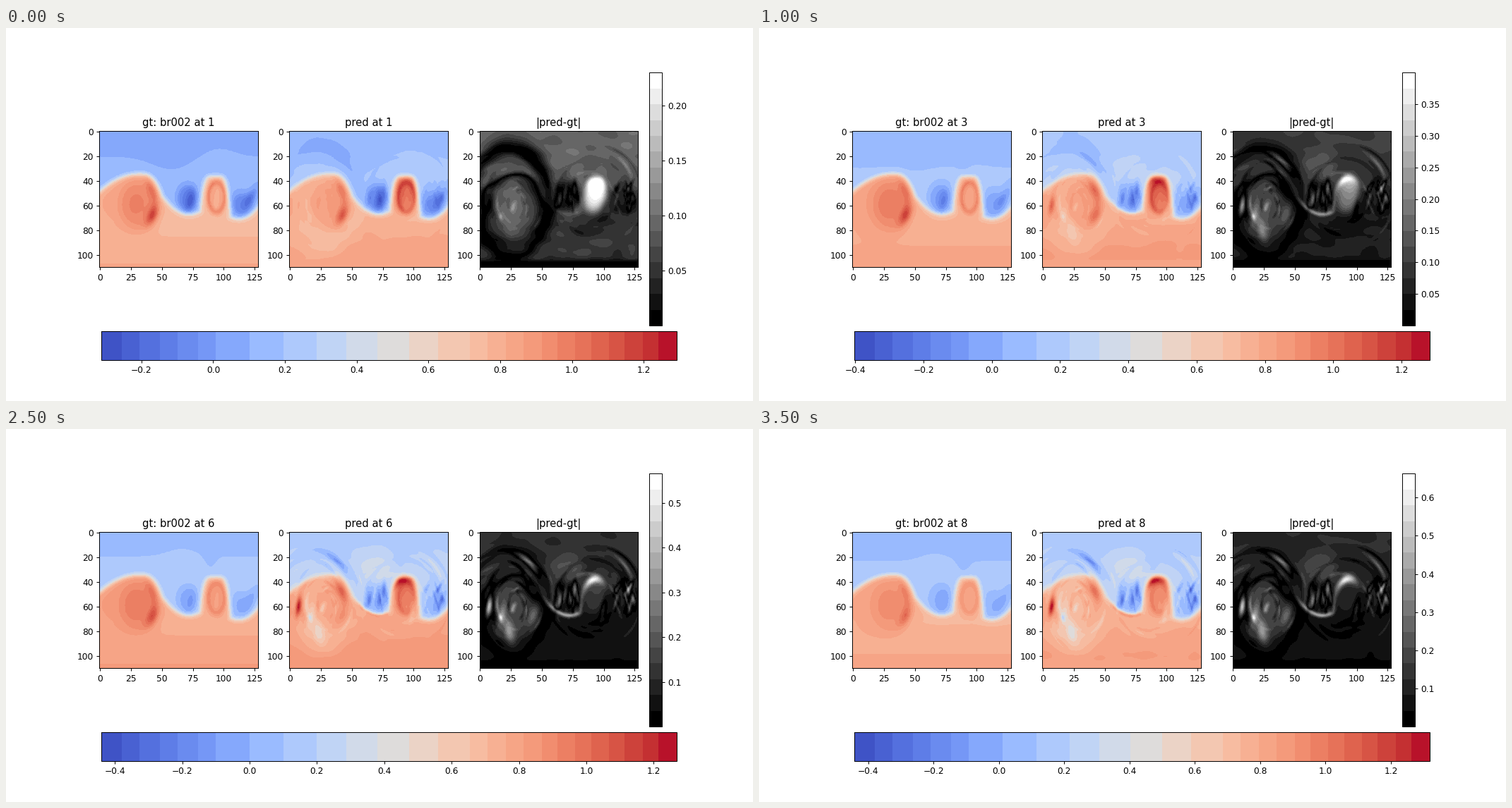
These frames come from a looping animation (1058 by 529 pixels, 4 s). A matplotlib script:

```python
import numpy as np
import matplotlib.pyplot as plt
from matplotlib.animation import FuncAnimation
from matplotlib.colors import ListedColormap, Normalize

WIDTH, INCHES = 1058, (12, 6)
COLS, ROWS, STEPS = 128, 110, 8
X, Y = np.meshgrid(np.arange(float(COLS)), np.arange(float(ROWS)))
rng = np.random.default_rng(12)


def value_limits(k):
    low = -.443 + .131 * np.exp(-.48 * k ** 1.3)
    high = max(1.291 - .0047 * k, 1.318 - .0356 * (STEPS - 1 - k))
    return low, high


def error_peak(k):
    return .2295 + .047 * k + .105 * (1 - np.exp(-k / 1.55))


def blob(cx, cy, rx, ry, deg=0, power=1):
    """Tilted bell; a higher power flattens its top."""
    a = np.radians(deg)
    dx, dy = X - cx, Y - cy
    u = (dx * np.cos(a) + dy * np.sin(a)) / rx
    v = (dy * np.cos(a) - dx * np.sin(a)) / ry
    return np.exp(-(u * u + v * v) ** power)


def arc(cx, cy, rx, ry, mid=0, span=1e4, width=2):
    """Soft stroke along an ellipse, centred on the angle mid."""
    dx, dy = (X - cx) / rx, (Y - cy) / ry
    turn = (np.degrees(np.arctan2(dy, dx)) - mid + 180) % 360 - 180
    radial = (np.hypot(dx, dy) - 1) * (rx + ry) / 2 / width
    return np.exp(-radial ** 2 - (turn / span) ** 2)


def bell(x, width):
    return np.exp(-((X - x) / width) ** 2)


def surface(x):
    """Height of the warm region: two domes standing on two basins."""
    left = 34 + np.where(x < 32, 14 * ((x - 32) / 32) ** 2, 20 * ((x - 32) / 19) ** 3)
    right = 36 + 31 * (abs(x - 93) / 12.3) ** 5
    basin = np.where(x < 93, np.where(x < 50, 51.5, 67 - .032 * (x - 72) ** 2),
                     70.5 - .04 * (x - 112) ** 2)
    return np.minimum(np.minimum(left, right), basin)


def depth_below_surface():
    xs = np.arange(-6, 135, .5)
    ys = surface(xs)
    best = np.full(X.shape, 1e9)
    for x, y, dx, dy in zip(xs, ys, np.diff(xs), np.diff(ys)):
        f = np.clip(((X - x) * dx + (Y - y) * dy) / (dx * dx + dy * dy), 0, 1)
        best = np.minimum(best, np.hypot(X - x - f * dx, Y - y - f * dy))
    return np.where(Y > surface(X), best, -best)


DEPTH = depth_below_surface()
WARM = .5 + .5 * np.tanh(DEPTH / 2.2)


def truth(k):
    t = k / (STEPS - 1)
    early = 17 + 10 * bell(58, 22) - 7 * bell(95, 18)
    late = 16 - 6 * bell(66, 16) + 9 * bell(89, 6)
    level = early + (late - early) * min(1, 2 * t)
    sky = .087 + .06 * np.tanh((Y - level) * .07)
    pits = (.24 * blob(70.5, 54, 9, 12, 0, 2) + .16 * blob(73, 56, 4, 10, 12)
            + .23 * blob(114, 59, 10, 11, 0, 1.5) + .2 * blob(122.5, 52, 4, 10, 28))
    sky -= (1 - .42 * t) * pits

    warm = np.maximum(.735, .765 + .0023 * (Y - 85))
    warm += .09 * blob(20, 57, 31, 27, 0, 2) + .1 * blob(94, 52, 10, 15, 0, 2)
    warm += (1 - .3 * t) * (.14 * blob(31, 59, 16, 21, 0, 2)
                            + .12 * blob(41.5, 46, 3.5, 9, -25))
    warm += .1 * arc(29, 58, 15, 20, 10, 50, 4)
    warm += (1 - .45 * t * t) * .22 * blob(42.5, 68, 4.2, 8, 25)
    warm += (1 - .5 * t) * (.16 * arc(94, 53, 6.5, 12, width=2.2)
                            - .06 * blob(94, 56, 2, 10, 5))
    return sky + (warm - sky) * WARM


def strokes(count, cx, cy, radii, stretch, weights, wander=5):
    """Random brush marks circling a centre."""
    total = np.zeros_like(X)
    for _ in range(count):
        r = rng.uniform(*radii)
        total += rng.uniform(*weights) * arc(
            cx + rng.uniform(-wander, wander), cy + rng.uniform(-wander, wander),
            r, stretch * r, rng.uniform(-180, 180), rng.uniform(12, 38),
            rng.uniform(.8, 2))
    return total


def upright_strokes(count, x0, x1, tilt):
    return sum(rng.uniform(-.5, .28) * blob(
        rng.uniform(x0, x1), rng.uniform(44, 63), rng.uniform(.8, 1.8),
        rng.uniform(4, 9), rng.uniform(-tilt, tilt)) for _ in range(count))


def ripple(count):
    waves = (np.cos(rng.normal(0, .16) * X + rng.normal(0, .24) * Y + rng.uniform(0, 6.3))
             for _ in range(count))
    return sum(waves) / np.sqrt(count)


BODY = strokes(36, 27, 60, (4, 24), 1.4, (-.36, .22)) * blob(26, 60, 25, 36, 0, 3)
HALO = strokes(30, 90, 53, (19, 42), 1, (-.18, .16), 8) * (Y < 98)
VEIL = strokes(24, 20, 52, (28, 40), 1, (-.2, .14)) * (1 - WARM)
PITS = (upright_strokes(14, 60, 80, 12) + upright_strokes(18, 104, 128, 35)) * (1 - .7 * WARM)
TEXTURE = BODY + HALO + VEIL + PITS
RIPPLE = ripple(12)

# Marks that strengthen with time: crescents, pale and hot patches, dome rim, basin edge
GROWING = (
    -.58 * arc(15, 48, 34, 34, -46, 22, 2.5) - .32 * arc(12, 51, 30, 30, -46, 20, 1.4)
    - .4 * blob(23, 80, 4, 9, -15) - .3 * blob(17, 68, 3, 11, 12)
    - .25 * blob(43, 67, 4, 9, 20) + .25 * blob(41, 46, 4, 9, -25)
    + .85 * blob(7, 60, 2.2, 8, 8)
    + .8 * arc(93, 53, 10, 15.5, -105, 45, 2.6) - .25 * blob(99, 62, 2, 9, 10)
    + .55 * np.exp(-(DEPTH / 1.6) ** 2 - ((X - 67) / 14) ** 4)
    + .13 * blob(70, 29, 13, 12, 0, 2))

LEFT_PIT = blob(70, 52, 11, 14, 0, 2)
RIGHT_PIT = blob(115, 57, 14, 14, 0, 2)
SURROUND = blob(24, 60, 27, 36, 0, 3)


def error(k):
    t, peak = k / (STEPS - 1), error_peak(k)
    grow = 1 - .85 * np.exp(-k / 1.5)
    ring = (1 - .55 * t) * arc(24, 55, 32, 42, width=7 - 3 * t)
    sky = (.09 + .03 * t) * (1 - WARM) * (1 - .95 * ring)
    sky *= (1 - .9 * LEFT_PIT) * (1 - .85 * RIGHT_PIT)
    ground = .05 * WARM * (1 - SURROUND) * (1 - .95 * ring) / (1 + np.exp((Y - 104) / 1.2))
    body = -(.09 + .09 * t) * blob(26, 62, 21, 31, 0, 2) * (.3 + .7 * WARM)
    dome = .7 * blob(92.5, 50, 9.5, 15, 12, 2) + .4 * blob(93, 42, 9, 7)
    total = sky + ground + body + .008 * RIPPLE * (Y < 104)
    total += peak * (np.exp(-k / 3) * dome * WARM + grow * GROWING
                     + (.5 + .5 * grow) * TEXTURE)
    return np.clip(total, -peak, peak)


def banded_coolwarm(bands=26):
    """Coolwarm in flat bands, widest around the pale middle."""
    edges = np.interp(np.arange(bands + 1), [0, 6, 9, 14, 17, bands],
                      [0, .2, .374, .64, .735, 1])
    band = np.searchsorted(edges, (np.arange(256) + .5) / 256) - 1
    return ListedColormap(plt.get_cmap("coolwarm")((edges[band] + edges[band + 1]) / 2))


fig, axes = plt.subplots(1, 3, figsize=INCHES, dpi=WIDTH / INCHES[0], facecolor="white")
value_norm = Normalize(*value_limits(0))
error_norm = Normalize(.0002, error_peak(0))
coolwarm, blank = banded_coolwarm(), np.zeros((ROWS, COLS))
gt_image = axes[0].imshow(blank, cmap=coolwarm, norm=value_norm)
pred_image = axes[1].imshow(blank, cmap=coolwarm, norm=value_norm)
diff_image = axes[2].imshow(blank, cmap=plt.get_cmap("gray", 16), norm=error_norm)
axes[2].set_title("|pred-gt|")
fig.colorbar(gt_image, ax=axes, orientation="horizontal", fraction=.1, pad=.02)
fig.colorbar(diff_image, ax=axes, fraction=.05, pad=.02)


def update(k):
    gt, err = truth(k), error(k)
    gt_image.set_data(gt)
    pred_image.set_data(gt + err)
    diff_image.set_data(np.abs(err))
    gt_image.set_clim(*value_limits(k))
    diff_image.set_clim(.0002, error_peak(k))
    axes[0].set_title(f"gt: br002 at {k + 1}")
    axes[1].set_title(f"pred at {k + 1}")
    return gt_image, pred_image, diff_image


anim = FuncAnimation(fig, update, frames=STEPS, interval=500, repeat=True,
                     repeat_delay=0, blit=False)
plt.show()
```
